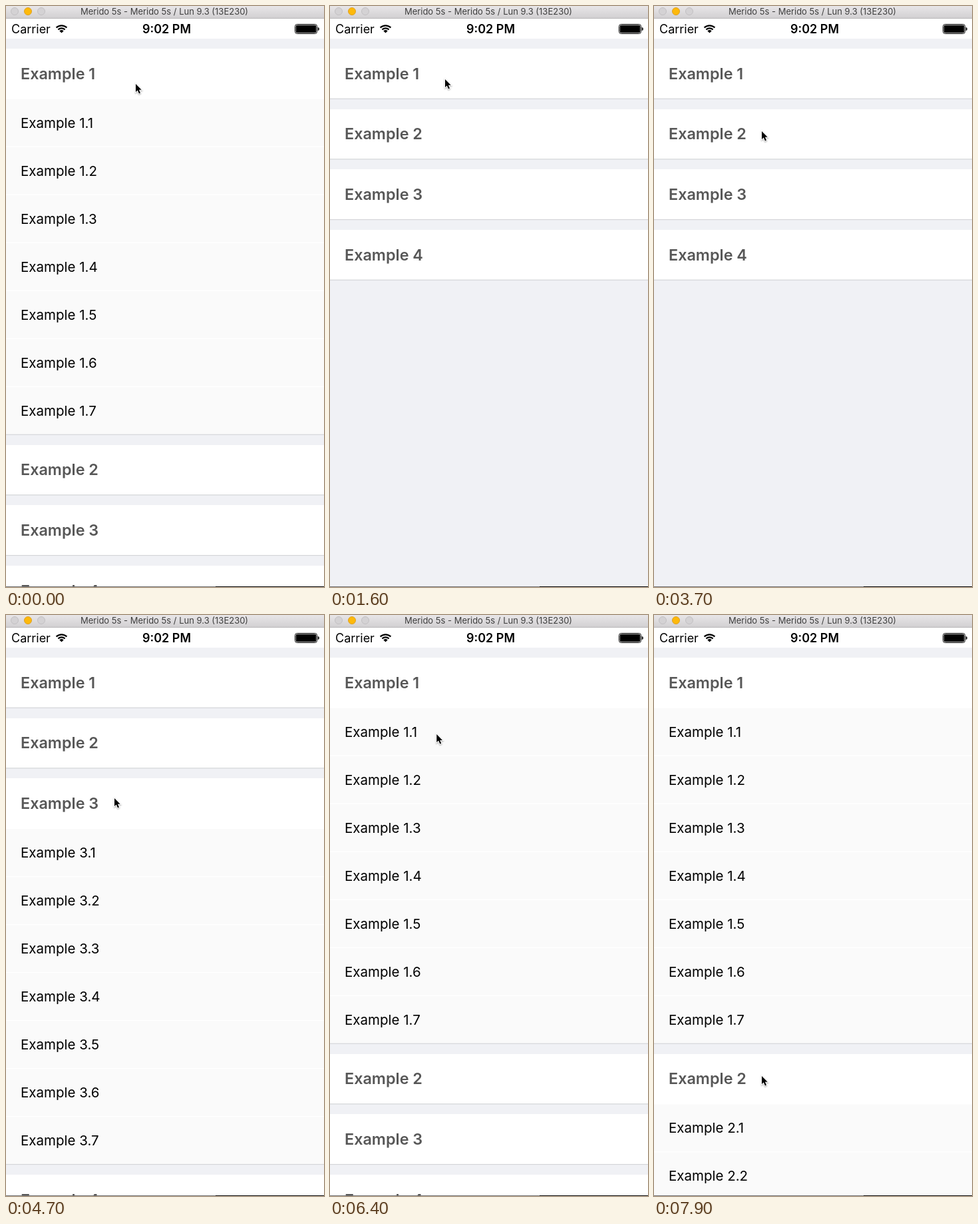
Write an HTML page with a canvas that moves like this. It is 478 by 872 pixels and loops after 8 s.

```html
<!DOCTYPE html>
<html lang="en">
<head>
<meta charset="utf-8">
<title>Accordion list</title>
<style>
  html, body { margin: 0; width: 100%; height: 100%; overflow: hidden; background: #f0f1f5; }
  canvas { display: block; }
</style>
</head>
<body>
<canvas id="stage" width="478" height="872"></canvas>
<script>
const W = 478, H = 872, LOOP = 8000, STEP = 100;
const c = document.getElementById('stage').getContext('2d');

const PITCH = 272 / 3, ROW = 72;
const rowCounts = [7, 2, 7, 0];

// Each tap flips one section: [time, section]
const taps = [[0, 0], [1600, 0], [2500, 1], [3700, 1], [4700, 2], [5700, 2], [6400, 0], [7900, 1]];

// Pointer glides: [start, end, x, y]
const glides = [
  [300, 600, 186, 183], [800, 1100, 173, 110], [1700, 2100, 165, 192],
  [2500, 3200, 162, 188], [3800, 4200, 163, 275], [5500, 5600, 163, 265],
  [5700, 6000, 162, 109], [6340, 7300, 148, 688], [7600, 7800, 162, 692]
];

const easeOut = f => 1 - (1 - f) ** 2;

function rect(x, y, w, h, color) {
  c.fillStyle = color;
  c.fillRect(x, y, w, h);
}

function text(str, x, y, size, weight, color, align = 'left') {
  c.font = `${weight} ${size}px Inter, sans-serif`;
  c.fillStyle = color;
  c.textAlign = align;
  c.fillText(str, x, y);
}

function pill(x, y, w, h, r, fill, stroke) {
  c.beginPath();
  c.roundRect(x, y, w, h, r);
  if (fill) { c.fillStyle = fill; c.fill(); }
  if (stroke) { c.strokeStyle = stroke; c.lineWidth = 1; c.stroke(); }
}

function drawSection(i, top, rows) {
  const edge = Math.round(top), bottom = top + 74.7 + rows * ROW;
  rect(0, edge, W, bottom - edge, '#fff');
  text(`Example ${i + 1}`, 22, top + 45.8, 23.4, 600, '#575757');
  for (let n = 0; n < rows; n++) {
    const y = top + 76 + n * ROW;
    rect(0, y, W, Math.min(70.5, bottom - y), '#fafafa');
    text(`Example ${i + 1}.${n + 1}`, 22, y + 42.8, 20.5, 400, '#000');
  }
  rect(0, bottom, W, 1.1, '#d3d4d7');
}

function drawList(t) {
  let top = 64;
  rowCounts.forEach((count, i) => {
    const flips = taps.filter(([at, section]) => section === i && at <= t).length;
    const rows = flips % 2 ? count : 0;
    drawSection(i, top, rows);
    top += PITCH + rows * ROW;
  });
}

function drawWindowBar() {
  const shade = c.createLinearGradient(0, 0, 0, 18);
  shade.addColorStop(0, '#e8e6e8');
  shade.addColorStop(1, '#d2d0d2');
  rect(0, 0, W, 18, shade);
  rect(0, 18, W, 1, '#b8b6b8');
  for (let i = 0; i < 3; i++) {
    const [fill, line] = i === 1 ? ['#fdb90b', '#dea125'] : ['#d4d2d4', '#c2c0c2'];
    pill(7.5 + i * 20, 2.5, 11, 11, 5.5, fill, line);
  }
  text('Merido 5s - Merido 5s / Lun 9.3 (13E230)', 238, 13, 13, 400, '#3e3e3e', 'center');
}

function drawWifi(x, y) {
  const a = -Math.PI * 0.75, b = -Math.PI * 0.25;
  c.strokeStyle = c.fillStyle = '#000';
  c.lineWidth = 2.2;
  for (const r of [7.2, 11.2]) {
    c.beginPath();
    c.arc(x, y, r, a, b);
    c.stroke();
  }
  c.beginPath();
  c.moveTo(x, y);
  c.arc(x, y, 4.4, a, b);
  c.fill();
}

function drawStatus() {
  rect(0, 19, W, 30, '#fff');
  text('Carrier', 8, 41, 18, 400, '#000');
  drawWifi(83.5, 40.5);
  text('9:02 PM', 241.5, 41, 18, 600, '#000', 'center');
  pill(434.5, 27.5, 33, 14, 3, null, '#000');
  pill(435.7, 28.7, 30.6, 11.6, 2, '#000');
  pill(468.8, 32, 2, 5, [0, 2, 2, 0], '#000');
}

function pointerAt(t) {
  let x = 195, y = 117;
  for (const [start, end, toX, toY] of glides) {
    if (t < start) break;
    const f = easeOut(Math.min(1, (t - start) / (end - start)));
    x += (toX - x) * f;
    y += (toY - y) * f;
  }
  return [x, y];
}

function drawPointer(t) {
  c.save();
  c.translate(...pointerAt(t));
  const arrow = new Path2D('M0 0V12L2.8 9.5L5 14.5L7 13.6L4.9 8.8H8.7Z');
  c.shadowColor = 'rgba(0,0,0,.35)';
  c.shadowBlur = 2;
  c.shadowOffsetY = 1;
  c.lineWidth = 2;
  c.strokeStyle = '#fff';
  c.stroke(arrow);
  c.shadowColor = 'transparent';
  c.fillStyle = '#000';
  c.fill(arrow);
  c.restore();
}

function draw(now) {
  const t = Math.floor((now % LOOP) / STEP) * STEP;
  rect(0, 0, W, H, '#f0f1f5');
  drawList(t);
  drawWindowBar();
  drawStatus();
  rect(0, 871, 315, 1, '#747476');
  rect(315, 871, W - 315, 1, '#0c0c0c');
  drawPointer(t);
}

const start = performance.now();
function tick() {
  draw(performance.now() - start);
  requestAnimationFrame(tick);
}
tick();
</script>
</body>
</html>
```
